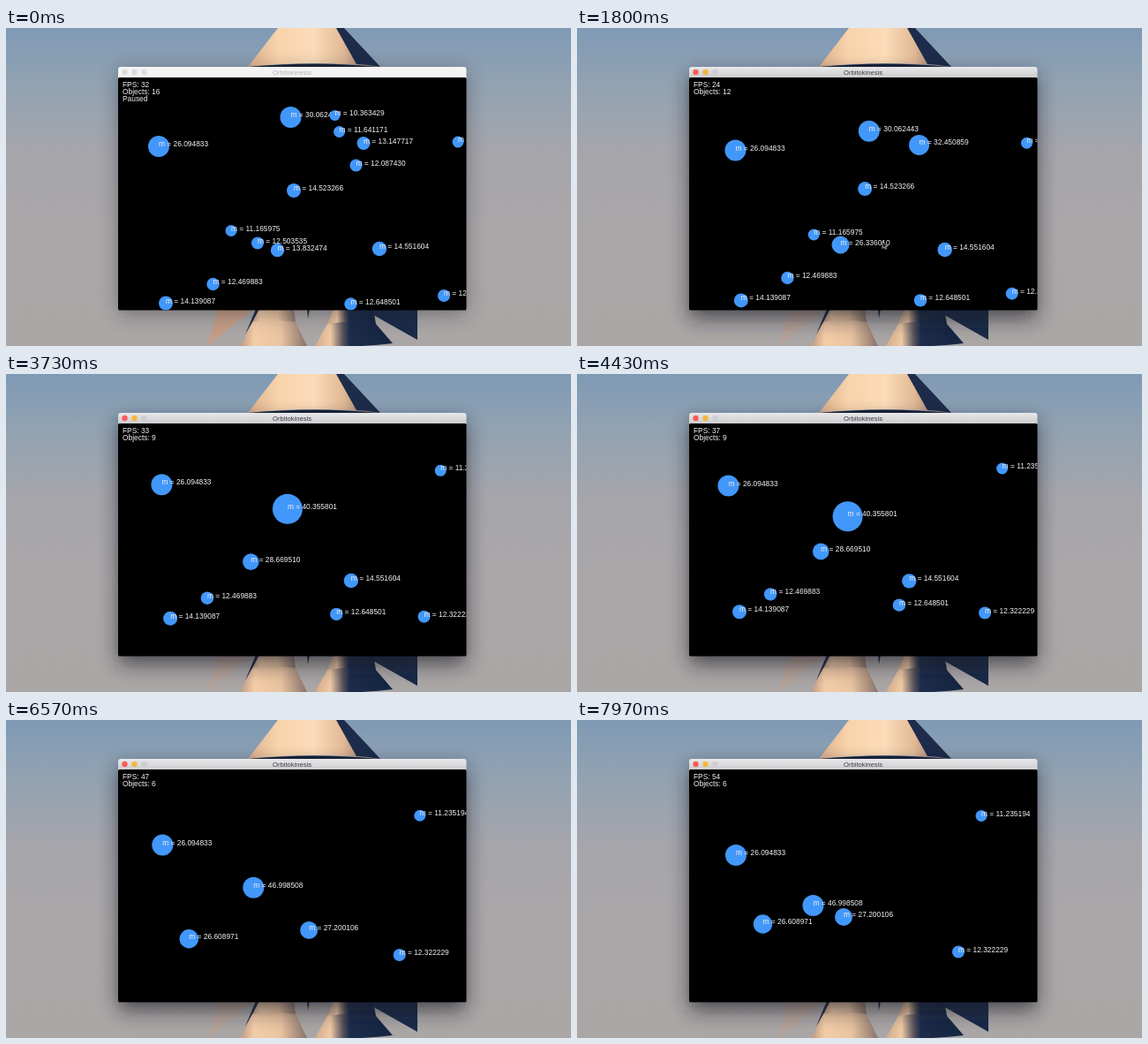
Animation, 640 px wide and 360 px high, one loop 8000 ms. Source, as an HTML page:

```html
<!DOCTYPE html>
<html lang="en">
<head>
<meta charset="utf-8">
<title>Orbitokinesis</title>
<style>
  html, body { margin: 0; width: 100%; height: 100%; overflow: hidden; background: #a8a6a8; }
  svg { display: block; width: 100vw; height: 100vh; }
  text { font-family: "Liberation Sans", Arial, sans-serif; }
  .hud, .label { font-size: 8.4px; fill: #f2f2f2; }
  .ball { fill: #4297fa; }
</style>
</head>
<body>
<svg viewBox="0 0 640 360" preserveAspectRatio="none">
  <defs>
    <linearGradient id="sky" x2="0" y2="1">
      <stop offset="0" stop-color="#7f9ab5"/>
      <stop offset=".17" stop-color="#91a2b2"/>
      <stop offset=".38" stop-color="#a5a5ab"/>
      <stop offset=".65" stop-color="#aba7a9"/>
      <stop offset="1" stop-color="#aaa6a5"/>
    </linearGradient>
    <linearGradient id="cone">
      <stop offset="0" stop-color="#dcb08c"/>
      <stop offset=".22" stop-color="#f8d3ab"/>
      <stop offset=".5" stop-color="#fbdcb8"/>
      <stop offset=".72" stop-color="#e2b996"/>
      <stop offset=".9" stop-color="#957c70"/>
    </linearGradient>
    <linearGradient id="foot">
      <stop offset="0" stop-color="#c09a80"/>
      <stop offset=".2" stop-color="#f3cda8"/>
      <stop offset=".6" stop-color="#e9c4a0"/>
      <stop offset="1" stop-color="#87726a"/>
    </linearGradient>
    <linearGradient id="footDark">
      <stop offset="0" stop-color="#d3ab8b"/>
      <stop offset=".2" stop-color="#efcaa5"/>
      <stop offset=".36" stop-color="#57535c"/>
      <stop offset=".45" stop-color="#1c2c4a"/>
      <stop offset="1" stop-color="#142540"/>
    </linearGradient>
    <linearGradient id="barOn" x2="0" y2="1">
      <stop offset="0" stop-color="#e8e8ea"/>
      <stop offset="1" stop-color="#cbcbce"/>
    </linearGradient>
    <filter id="blur" x="-30%" y="-30%" width="160%" height="160%">
      <feGaussianBlur stdDeviation="11"/>
    </filter>
    <clipPath id="view"><rect x="127" y="56" width="394.5" height="263.5"/></clipPath>
  </defs>

  <rect width="640" height="360" fill="url(#sky)"/>

  <!-- rocket -->
  <path d="M308 0H383L424 44Q350 36 274 44Z" fill="url(#cone)"/>
  <path d="M374 0H383L424 44Q407 41 397 41Z" fill="#1c2c4a"/>
  <path d="M274 44Q350 37 422 44Z" fill="#182338"/>
  <path id="fin" d="M240 318H280L228 360Z" fill="#c39c85"/>
  <path d="M404 318H466V353Z" fill="#1a2b48"/>
  <path d="M283 318H326L328 333H278Z" fill="url(#foot)"/>
  <path d="M278 333Q303 329 328 333L341 360H266Z" fill="url(#foot)"/>
  <path d="M283 318L271 347L279 333L287 318Z" fill="#1c2a44"/>
  <path d="M341 318H344L342 329Z" fill="#1c2a44"/>
  <path d="M371 318H416L419 335H364Z" fill="url(#footDark)"/>
  <path d="M364 335Q391 330 419 335L438 357Q400 362 350 360Z" fill="url(#footDark)"/>

  <rect id="shadow" x="127" y="46" width="394" height="276" rx="4" fill="#1c1d26" filter="url(#blur)"/>

  <!-- window -->
  <path id="bar" d="M127 57V47Q127 44 130 44H518.5Q521.5 44 521.5 47V57Z"/>
  <rect x="127" y="56" width="394.5" height="263.5" rx="1.5"/>
  <g id="lights">
    <circle cx="134.5" cy="50" r="3.2"/>
    <circle cx="145.5" cy="50" r="3.2"/>
    <circle cx="156.5" cy="50" r="3.2"/>
  </g>
  <text id="title" x="324" y="52.7" font-size="7.6" text-anchor="middle">Orbitokinesis</text>

  <g clip-path="url(#view)"><g id="space"></g></g>
  <text class="hud" id="fps" x="132" y="66.8"></text>
  <text class="hud" id="count" x="132" y="75"></text>
  <text class="hud" id="paused" x="132" y="83.3">Paused</text>
  <path id="cursor" d="M346 241.5V249.5L348 247.7L349.3 250.3L350.5 249.7L349.2 247.2H351.8Z" fill="#111" stroke="#eee" stroke-width=".7"/>
</svg>
<script>
const LOOP = 8000, START = 430, END = 7970;
const $ = id => document.getElementById(id);
const bodies = [];

function make(tag, cls, parent) {
  const el = document.createElementNS("http://www.w3.org/2000/svg", tag);
  el.setAttribute("class", cls);
  return parent.appendChild(el);
}

// Speeds are in pixels per second.
function star(mass, r, x, y, vx = 0, vy = 0, born = START) {
  const g = make("g", "body", $("space"));
  make("circle", "ball", g).setAttribute("r", r);
  const label = make("text", "label", g);
  label.textContent = "m = " + mass;
  const b = { g, mass: Number(mass), r, x, y, vx, vy, born };
  bodies.push(b);
  return b;
}

// Constant acceleration that brings a body to (x, y) at the given time.
function travel(b, x, y, time) {
  const s = (time - b.born) / 1000;
  b.died = time;
  b.ax = (x - b.x - b.vx * s) / (s * s);
  b.ay = (y - b.y - b.vy * s) / (s * s);
  b.endVx = b.vx + 2 * b.ax * s;
  b.endVy = b.vy + 2 * b.ay * s;
}

// Two bodies touch around (x, y) along an angle; momentum carries over.
function merge(a, b, time, mass, r, x, y, degrees) {
  const dx = Math.cos(degrees * Math.PI / 180), dy = Math.sin(degrees * Math.PI / 180);
  travel(a, x - a.r * dx, y - a.r * dy, time);
  travel(b, x + b.r * dx, y + b.r * dy, time);
  const mean = key => (a.mass * a[key] + b.mass * b[key]) / (a.mass + b.mass);
  return star(mass, r, x, y, mean("endVx"), mean("endVy"), time);
}

const rest = (b, x, y) => travel(b, x, y, END);

// top cluster
const big = star("30.062443", 12, 322.5, 101, 7, 4);
const left = merge(
  star("10.363429", 6, 372.5, 99), star("11.641171", 6.5, 377.5, 117.5),
  1000, "22.004600", 9, 377, 110, 80);
const right = merge(
  star("13.147717", 7.5, 405, 130.5), star("12.087430", 7, 396.5, 155.5),
  1350, "25.235147", 10, 400, 143, 105);
const joined = merge(left, right, 1600, "32.450859", 11.5, 390, 132, 50);
const giant = merge(big, joined, 2550, "41.195965", 14.3, 346, 138, 10);
const core = merge(giant, star("14.523266", 8, 326, 184, 0, 1.5),
  3250, "40.355801", 17, 330, 168, 115);

// middle cluster
const small = star("11.165975", 6.5, 255, 229.5, 5, 1.5);
const pair = merge(
  star("12.503535", 7, 285, 243.5), star("13.832474", 7.7, 307.5, 251.5),
  1300, "26.336010", 10, 298, 247, 20);
const trio = merge(small, pair, 2450, "28.669510", 9.3, 285, 242, 20);
rest(merge(core, trio, 5000, "46.998508", 12, 307, 210, 125), 285.5, 237);

// lower pairs
rest(merge(
  star("14.551604", 8.2, 423, 250, -3.3, .6), star("12.648501", 7.2, 390.5, 312.5, -.7, -.5),
  5150, "27.200106", 10, 383, 273, 110), 320, 250);
rest(merge(
  star("12.469883", 7.2, 234.5, 290, 4, -5), star("14.139087", 8, 181, 311.5, 2.6, -.5),
  6100, "26.608971", 10.7, 224, 278, 150), 228.5, 258);

// loners
rest(star("26.094833", 12, 173, 134, 5, 3.5), 198, 180);
rest(star("11.235194", 6.5, 512, 129, -1.2, 1.7), 476, 135.5);
rest(star("12.322229", 7, 496, 303, -1.6, -.9), 450, 289.5);

function ease(t, from, to) {
  const u = Math.min(1, Math.max(0, (t - from) / (to - from)));
  return u * u * (3 - 2 * u);
}

const show = (el, on) => el.setAttribute("visibility", on ? "visible" : "hidden");
const paint = (el, color) => el.setAttribute("fill", color);
const move = (el, x, y) => el.setAttribute("transform", `translate(${x} ${y})`);

function draw(now) {
  const running = now >= START;
  const t = Math.min(END, Math.max(START, now));
  let alive = 0;
  for (const b of bodies) {
    const on = t >= b.born && (t < b.died || b.died === END);
    show(b.g, on);
    if (!on) continue;
    alive++;
    const s = (t - b.born) / 1000;
    move(b.g, b.x + (b.vx + b.ax * s) * s, b.y + (b.vy + b.ay * s) * s);
  }
  move($("space"), -18 * ease(t, 3000, 4300), -27 * ease(t, 1500, 4300));

  $("fps").textContent = "FPS: " + (running ? Math.floor(15 + t / 200) : 32);
  $("count").textContent = "Objects: " + alive;
  show($("paused"), !running);
  show($("cursor"), running && t < 2100);

  paint($("bar"), running ? "url(#barOn)" : "#f4f4f5");
  paint($("title"), running ? "#3c3c40" : "#b2b2b6");
  const colors = running ? ["#fc5b57", "#f6b73e", "#cdcdd2"] : Array(3).fill("#dcdce0");
  [...$("lights").children].forEach((dot, i) => paint(dot, colors[i]));
  $("shadow").setAttribute("opacity", running ? .65 : .4);
  move($("shadow"), 0, running ? 7 : 2);
  $("fin").setAttribute("opacity", running ? .4 : 1);
}

const origin = performance.now();
function tick() {
  draw((performance.now() - origin) % LOOP);
  requestAnimationFrame(tick);
}
tick();
</script>
</body>
</html>
```
